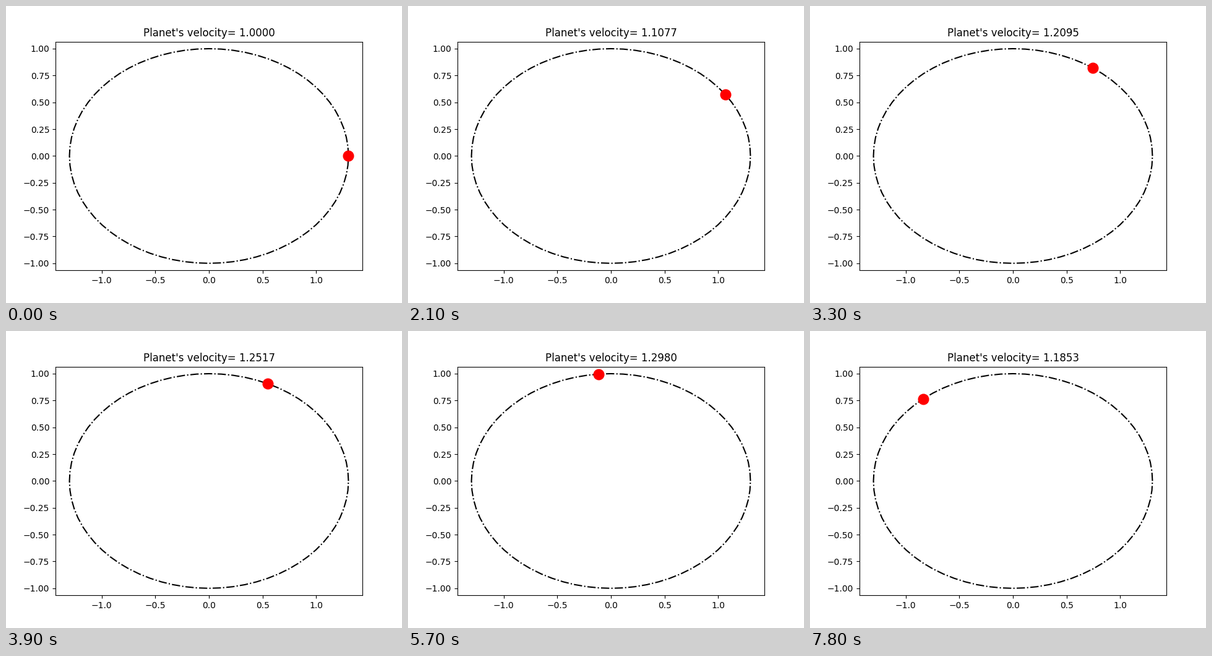
Write a matplotlib script that moves like this. It is 640 by 480 pixels and loops after 8000 ms.

```python
import numpy as np
import matplotlib.pyplot as plt
from matplotlib.animation import FuncAnimation

A, B = 1.3, 1.0            # semi-axes of the orbit
STEP = np.radians(5)       # angle advanced per step
TICK_MS, LOOP_MS, STEP_MS = 100, 8000, 300

plt.rcParams["text.kerning_factor"] = 6   # whole-pixel kerning


def position(angle):
    return A * np.cos(angle), B * np.sin(angle)


def speed(angle):
    return np.hypot(A * np.sin(angle), B * np.cos(angle))


fig, ax = plt.subplots(figsize=(6.4, 4.8), dpi=100)
ax.axis("equal")
ax.plot(*position(np.arange(73) * STEP), "k-.", lw=1.5)
planet, = ax.plot([A], [0], "ro", markersize=12)
title = ax.set_title("")


def update(tick):
    angle = tick * TICK_MS // STEP_MS * STEP
    x, y = position(angle)
    planet.set_data([x], [y])
    title.set_text(f"Planet's velocity= {speed(angle):.4f}")
    return planet, title


anim = FuncAnimation(fig, update, frames=LOOP_MS // TICK_MS, interval=TICK_MS,
                     init_func=lambda: update(0), repeat=True, repeat_delay=0)
plt.show()
```
